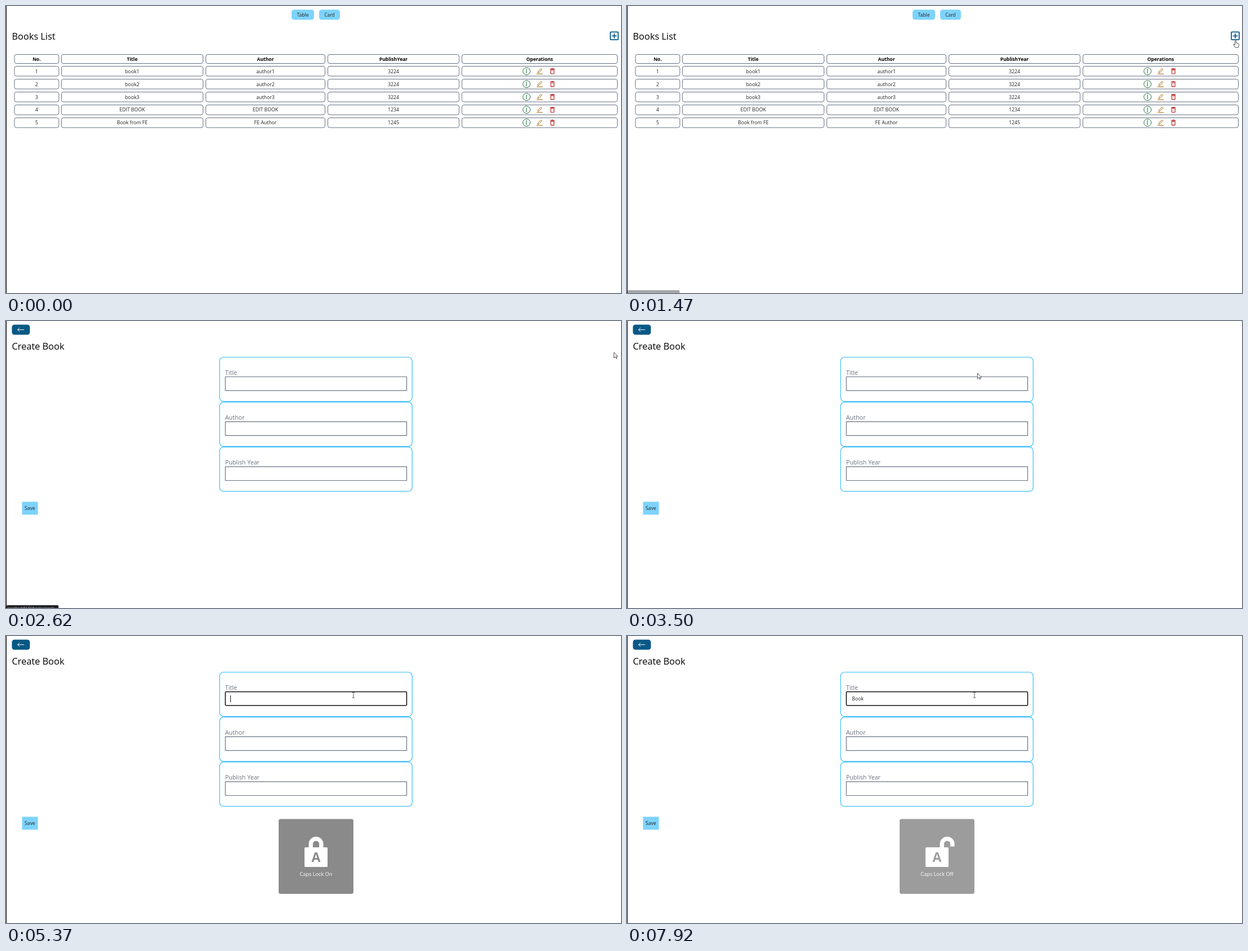
Recreate the animation shown at these times as an HTML page with a canvas. Size 1094 by 512 pixels, loop 8000 ms.

```html
<!DOCTYPE html>
<html lang="en">
<head>
<meta charset="utf-8">
<title>Books List</title>
<style>
  html, body { margin: 0; width: 100%; height: 100%; overflow: hidden; background: #fff; }
  canvas { display: block; }
</style>
</head>
<body>
<canvas id="stage" width="1094" height="512"></canvas>
<script>
const ctx = document.getElementById('stage').getContext('2d');
const LOOP = 8000;
const FONT = '"Open Sans", "Noto Sans", sans-serif';
const SKY = '#7dd3fc', NAVY = '#075985', INK = '#222', TOAST = '#8a8a8a';

const columns = [
  { name: 'No.', x: 15, w: 79 },
  { name: 'Title', x: 98.5, w: 252 },
  { name: 'Author', x: 355.5, w: 212 },
  { name: 'PublishYear', x: 572.5, w: 233.5 },
  { name: 'Operations', x: 811, w: 276.5 }
];
const books = [
  ['book1', 'author1', '3224'],
  ['book2', 'author2', '3224'],
  ['book3', 'author3', '3224'],
  ['EDIT BOOK', 'EDIT BOOK', '1234'],
  ['Book from FE', 'FE Author', '1245']
];
const fields = ['Title', 'Author', 'Publish Year'];

// Pointer stops: time, x, y of the hotspot
const pointerPath = [
  [150, 1089, 416], [200, 1076, 350], [250, 1067, 285], [300, 1083, 221],
  [690, 1083, 221], [1290, 1082.5, 61], [1930, 1082.5, 61], [2030, 1081.5, 56],
  [2930, 1081.5, 56], [3500, 623.5, 93], [3620, 623.5, 104],
  [3960, 623.5, 104], [3990, 620.5, 104.5], [4529, 620.5, 104.5], [4530, 618, 105]
];
const typing = [[5750, 'B'], [6140, 'Bo'], [6300, 'Boo'], [7120, 'Book']];
const caretSpans = [[4300, 4830], [5370, 6840], [7120, 7640]];

const within = (t, a, b) => t >= a && t < b;
const clamp01 = v => Math.min(1, Math.max(0, v));

function text(str, x, y, size, color = INK, align = 'center', weight = 400) {
  ctx.font = `${weight} ${size}px ${FONT}`;
  ctx.textAlign = align;
  ctx.fillStyle = color;
  ctx.fillText(str, x, y);
}

function box(x, y, w, h, r, fill, stroke, line = 1) {
  ctx.beginPath();
  ctx.roundRect(x, y, w, h, r);
  if (fill) { ctx.fillStyle = fill; ctx.fill(); }
  if (stroke) { ctx.strokeStyle = stroke; ctx.lineWidth = line; ctx.stroke(); }
}

// Runs a drawing in a square view box centred on a point
function icon(cx, cy, size, view, draw) {
  ctx.save();
  ctx.translate(cx - size / 2, cy - size / 2);
  ctx.scale(size / view, size / view);
  draw();
  ctx.restore();
}

function strokePath(d, color, width) {
  ctx.strokeStyle = color;
  ctx.lineWidth = width;
  ctx.stroke(new Path2D(d));
}

function fillPath(d, color) {
  ctx.fillStyle = color;
  ctx.fill(new Path2D(d), 'evenodd');
}

function infoIcon(x, y) {
  icon(x, y, 13.85, 16, () => {
    strokePath('M.5 8a7.5 7.5 0 1 0 15 0a7.5 7.5 0 1 0 -15 0', '#166534', 1.1);
    strokePath('M6.7 7.1L8.2 6.9L7.2 11.6Q7.2 12.5 8.6 11.9', '#166534', 1.15);
    fillPath('M7 4.5a1 1 0 1 0 2 0a1 1 0 1 0 -2 0', '#166534');
  });
}

function editIcon(x, y) {
  icon(x, y, 13.85, 24, () => {
    ctx.lineJoin = 'round';
    strokePath('M6.1 16.8L6.8 13L16.1 3.7L19.1 6.7L9.8 16.1Z', '#a16207', 1.7);
    fillPath('M2.6 19.6H21.4V21.4H2.6Z', '#a16207');
  });
}

function deleteIcon(x, y) {
  icon(x, y, 13.85, 24, () => fillPath(
    'M6 7V19Q6 21 8 21H16Q18 21 18 19V7ZM8 9H16V19H8ZM5 4H8.5L9.5 3H14.5L15.5 4H19V6H5Z', '#b91c1c'));
}

function addIcon(x, y) {
  icon(x, y, 20.8, 24, () => fillPath(
    'M5 3H19Q21 3 21 5V19Q21 21 19 21H5Q3 21 3 19V5Q3 3 5 3ZM5 5V19H19V5Z' +
    'M11 7H13V11H17V13H13V17H11V13H7V11H11Z', NAVY));
}

function listPage() {
  box(508, 6.5, 40, 18, 4.6, SKY);
  box(557, 6.5, 37, 18, 4.6, SKY);
  text('Table', 528, 18.8, 8.5);
  text('Card', 575.5, 18.8, 8.5);
  text('Books List', 10.5, 60, 16.4, '#000', 'left');
  addIcon(1082, 53.3);

  for (const c of columns) {
    box(c.x, 86.5, c.w, 16, 3.5, null, '#657083');
    text(c.name, c.x + c.w / 2, 98, 8.55, '#000', 'center', 700);
  }
  books.forEach((book, i) => {
    const y = 116.4 + i * 22.9;
    const top = Math.round(y - 9) + .5;
    [i + 1, ...book, ''].forEach((value, k) => {
      const c = columns[k];
      box(c.x, top, c.w, 17.5, 3.5, null, '#657083');
      text(value, c.x + c.w / 2, y + 3.3, 8.75);
    });
    infoIcon(926, y);
    editIcon(949.3, y);
    deleteIcon(972, y);
  });
}

function formPage(t) {
  box(10.5, 6.5, 32, 18, 4.6, NAVY);
  icon(26.3, 15.5, 13.85, 16, () => {
    ctx.lineCap = ctx.lineJoin = 'round';
    strokePath('M14.5 8H1.5M5.3 4.2L1.5 8L5.3 11.8', '#fff', 1.1);
  });
  text('Create Book', 10.5, 51, 16.4, '#000', 'left');

  fields.forEach((label, i) => {
    const y = 80.2 * i;
    const focused = i === 0 && t >= 4280;
    box(380, 64.5 + y, 342.5, 79, 7, null, '#38bdf8', 1.2);
    text(label, 389.8, 95.6 + y, 10.7, '#6b7280', 'left');
    box(390.2, 99.5 + y, 322.5, 24.6, focused ? 1.5 : 0, null,
      focused ? '#101010' : '#6b7280', focused ? 1.5 : 1.2);
  });

  box(28.5, 322.5, 28.2, 23, 0, SKY);
  text('Save', 42.5, 337.2, 8.75);

  const typed = typing.reduce((s, [at, str]) => t >= at ? str : s, '');
  text(typed, 400, 115.2, 8.75, INK, 'left');
  if (caretSpans.some(([a, b]) => within(t, a, b))) {
    ctx.fillStyle = '#111';
    ctx.fillRect(Math.floor(400 + ctx.measureText(typed).width - .2), 106, 1, 12);
  }
  if (t >= 5110) capsToast(t);
}

function capsToast(t) {
  const locked = t < 5900;
  const cx = locked ? 551.5 : 569.6;
  ctx.save();
  if (t >= 7920) ctx.globalAlpha = .84;
  box(485, 326.5, 133, 133.5, 3.5, TOAST);
  ctx.globalAlpha = 1;
  box(531, 377, 41, 35, 1.5, '#fff');
  strokePath(`M${cx - 9.3} 378V371A9.3 9.3 0 0 1 ${cx + 9.3} 371V${locked ? 378 : 375.5}`, '#fff', 7.4);
  text('A', 551.5, 403, 23, t >= 7920 ? '#9d9d9d' : TOAST, 'center', 700);
  text(locked ? 'Caps Lock On' : 'Caps Lock Off', 551.5, 428.3, 9.2, '#fff');
  ctx.restore();
}

function statusBar(t) {
  const shown = t < 1470 ? 0 : t < 1520 ? .4 : t < 1570 ? .75 : 1;
  const alpha = Math.min(shown, 1 - clamp01((t - 2950) / 110));
  if (!alpha) return;
  ctx.save();
  ctx.globalAlpha = alpha;
  box(1, 507, 92.5, 8, 2, '#202124');
  text('localhost:5173/books/create', 3, 515, 6.3, '#d5d5d5', 'left');
  ctx.restore();
}

function pointerAt(t) {
  const next = pointerPath.findIndex(p => p[0] > t);
  if (next < 0) return pointerPath[pointerPath.length - 1].slice(1);
  const [t0, x0, y0] = pointerPath[next - 1];
  const [t1, x1, y1] = pointerPath[next];
  let k = (t - t0) / (t1 - t0);
  if (t1 - t0 > 300) k = k * k * (3 - 2 * k);
  return [x0 + (x1 - x0) * k, y0 + (y1 - y0) * k];
}

function pointer(t) {
  if (t < 150) return;
  const [x, y] = pointerAt(t);
  const overInput = t > 3000 && y >= 99;
  const overLink = within(t, 1200, 2620) && y <= 62;
  ctx.save();
  ctx.translate(x, y);
  ctx.lineJoin = 'round';
  let shape = 'M0 0V10L2.4 7.8L4 11L5.4 10.4L3.9 7.2H6.8Z';
  if (overInput) {
    shape = 'M-2.5 -4.5H-.7L0 -4L.7 -4.5H2.5M0 -4V4.5M-2.5 5H-.7L0 4.5L.7 5H2.5';
  } else if (overLink) {
    shape = 'M-1 1Q0 -.6 1 1V5L5 6Q6.2 6.3 6 8L5 13H-.5L-3.6 8.5Q-3.8 7 -2.4 7.3L-1 8.5Z';
  }
  if (!overInput) fillPath(shape, '#fff');
  strokePath(shape, '#333', .85);
  ctx.restore();
}

function draw(now) {
  const t = now % LOOP;
  ctx.fillStyle = '#fff';
  ctx.fillRect(0, 0, 1094, 512);
  if (t < 2580) listPage(); else formPage(t);
  statusBar(t);
  ctx.fillStyle = '#000';
  ctx.fillRect(0, 0, 1, 512);
  pointer(t);
}

function tick() {
  draw(performance.now());
  requestAnimationFrame(tick);
}
tick();
</script>
</body>
</html>
```
